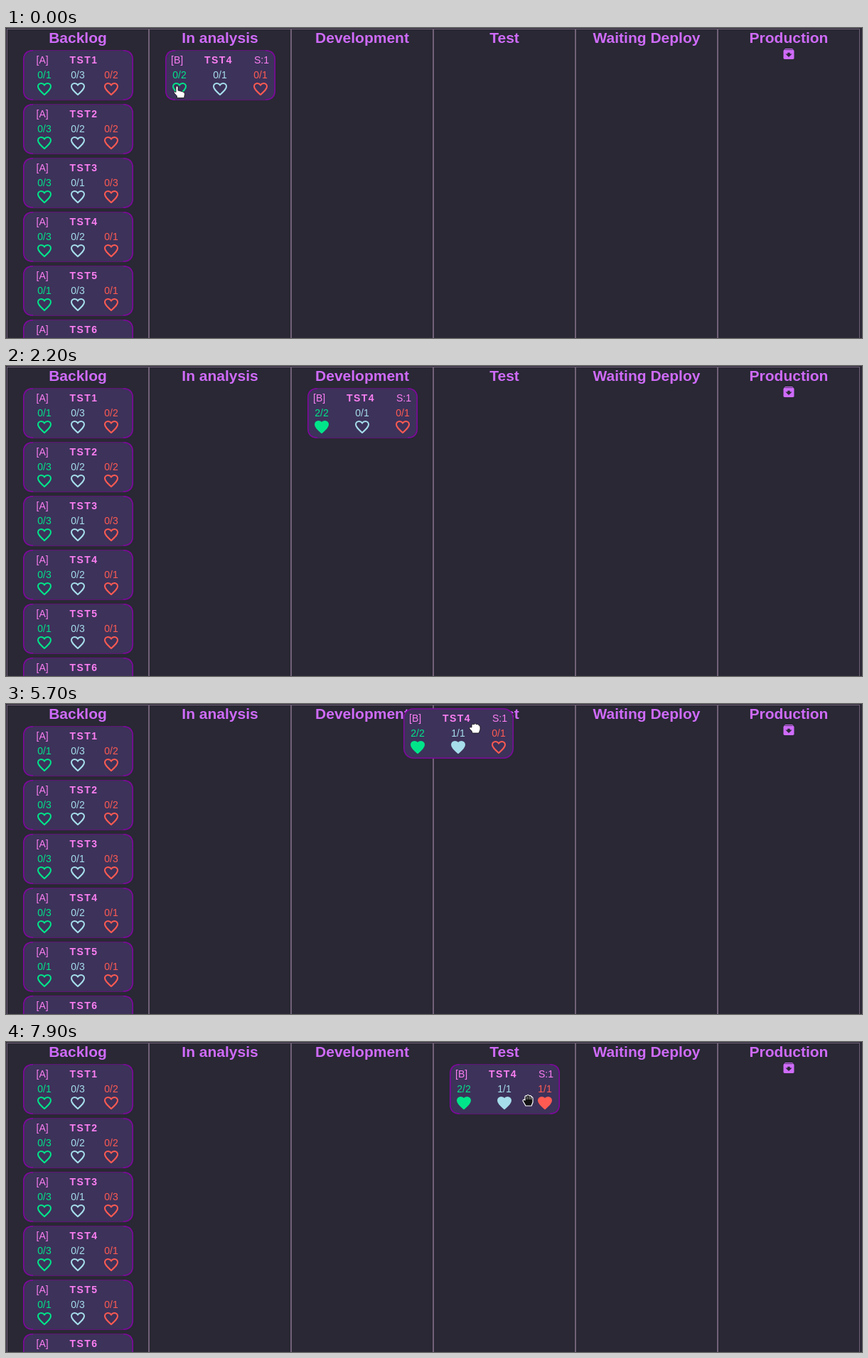
An HTML page that plays this animation: 1204x437 px, repeating every 8000 ms.

```html
<!DOCTYPE html>
<html lang="en">
<head>
<meta charset="utf-8">
<title>Board</title>
<style>
  html, body { margin: 0; width: 100%; height: 100%; overflow: hidden; background: #292834; }
  svg { display: block; width: 1204px; height: 437px; }
  text { font: 14px "Liberation Sans", Arial, sans-serif; }
  .head { font-size: 21px; font-weight: bold; fill: #cf6bfa; text-anchor: middle; }
  .title { font-weight: bold; letter-spacing: 1.4px; }
  .pink { fill: #fb7ff2; }
  .mid { text-anchor: middle; }
</style>
</head>
<body>
<svg viewBox="0 0 1204 437">
  <defs>
    <path id="heart" stroke-width="2" d="M12 20C6.5 15 3 11.9 3 8.5C3 6 5 4 7.5 4C9.4 4 11.1 5 12 6.4C12.9 5 14.6 4 16.5 4C19 4 21 6 21 8.5C21 11.9 17.5 15 12 20Z"/>
    <g id="arrow" fill="#111" stroke="#fff" stroke-width="1.2" stroke-linejoin="round">
      <path d="M-4-8V6L-1 3L1.5 8.5L4 7.3L1.6 2H6Z"/>
    </g>
    <g id="point" fill="#fff" stroke="#111" stroke-width=".8">
      <path d="M-5-7Q-3-9.500-2-7V-2L5 0Q7.500 1 7.500 3L6.500 8.500H-3.500V6L-8 1Q-7.500-1.500-5 .500Z"/>
    </g>
    <g id="fist" fill="#fff" stroke="#111" stroke-width=".8">
      <path d="M-4-4Q-3-7-1-5Q1-8 3-5Q5-7 6-4Q8-4 8-1V2L6 7H-3L-4 4L-7 1Q-8-2-4-1Z"/>
    </g>
    <g id="grab" fill="#111" stroke="#fff" stroke-width="1.2" stroke-linejoin="round">
      <path d="M-4-5Q-3-7-1.500-6Q0-9 2-6Q4-7.500 5-4.500Q7-5 7-2V3L5 8H-3L-7 1Q-6.500-2-4 0Z"/>
      <path d="M-1-5V-1M2-5V-1M4.500-4V-1" stroke-width=".7"/>
    </g>
  </defs>
  <g id="board"></g>
  <g id="moving"></g>
</svg>
<script>
const LOOP = 8000, STEP = 100;
const HEART_COLORS = ['#00e58a', '#a6deeb', '#ff5b52'];
const COLUMNS = ['Backlog', 'In analysis', 'Development', 'Test', 'Waiting Deploy', 'Production'];
const BACKLOG_TOTALS = ['132', '322', '313', '321', '131', '222'];

// [time, x, y]
const cardPath = [
  [0, 224, 31], [1100, 224, 31], [1600, 364, 22], [2000, 555, 14], [2200, 424, 31],
  [5100, 424, 31], [5700, 559, 6], [5900, 650, 3], [6000, 692, 9], [6100, 702, 10], [6200, 624, 31]
];
// [time, x, y, shape]; no shape means the pointer is off stage
const cursorPath = [
  [0, 244, 90, 'point'], [800, 244, 90, 'point'], [1000, 274, 97, 'grab'],
  [1100, 292, 61, 'fist'], [1600, 432, 53, 'fist'], [2000, 623, 45, 'fist'], [2100, 628, 25, 'arrow'], [2200, 628, 0],
  [3300, 528, 6, 'arrow'], [3500, 523, 42, 'grab'], [3700, 508, 92, 'point'], [4000, 505, 99.5, 'point'],
  [4100, 505, 102, 'point'], [4200, 505, 102, 'point'], [4300, 470, 106, 'arrow'], [4600, 206, 90, 'arrow'],
  [4900, 558, 33, 'grab'], [5000, 524, 59, 'grab'],
  [5100, 524, 59, 'fist'], [5700, 659, 34, 'fist'], [5900, 750, 31, 'fist'], [6000, 792, 37, 'fist'],
  [6100, 802, 38, 'fist'], [6200, 802, 20, 'arrow'], [6300, 802, 0],
  [7100, 793, 5, 'arrow'], [7300, 783, 50, 'grab'], [7500, 760, 96, 'point'], [7700, 758, 96, 'point'],
  [7900, 734, 82, 'grab']
];

function sample(path, time) {
  const index = path.findLastIndex(key => key[0] <= time);
  const [t0, x0, y0, shape] = path[index];
  const [t1, x1, y1] = path[index + 1] || [t0 + 1, x0, y0];
  const k = Math.min(1, (time - t0) / (t1 - t0));
  return { x: x0 + (x1 - x0) * k, y: y0 + (y1 - y0) * k, shape };
}

const text = (x, y, cls, content, fill = '') =>
  `<text x="${x}" y="${y}" class="${cls}" ${fill && `fill="${fill}"`}>${content}</text>`;

const rect = (x, y, w, h, attrs) =>
  `<rect x="${x}" y="${y}" width="${w}" height="${h}" ${attrs}/>`;

function card({ x, y, kind, title, done, totals, size, lifted }) {
  const gap = size ? 57 : 47;
  const hearts = HEART_COLORS.map((color, i) => {
    const cx = 77 + (i - 1) * gap;
    const full = done[i] == totals[i];
    return text(cx, 40, 'mid', `${done[i]}/${totals[i]}`, color) +
      `<use href="#heart" x="${cx - 12}" y="43" stroke="${color}" fill="${full ? color : 'none'}"/>`;
  }).join('');
  return `<g transform="translate(${x} ${y})">` +
    rect(0, 0, 155, 71, 'rx="14" fill="#7d0a9c"' + (lifted ? '' : ' opacity=".65"')) +
    rect(1.5, lifted ? 1.5 : 1, 152, lifted ? 68 : 69, 'rx="13" fill="#3d325a"') +
    (lifted ? '' : '<path d="M14 .75Q.75 .75 .75 14V57Q.75 70 14 70M141 .75Q154.250 .75 154.250 14V57Q154.250 70 141 70" fill="none" stroke="#7d0a9c" stroke-width="1.500"/>') +
    text(size ? 8 : 18.5, 19, 'pink', `[${kind}]`) +
    text(size ? 55 : 65.5, 19, 'pink title', title) +
    (size ? text(125, 19, 'pink', size) : '') + hearts + '</g>';
}

function drawBoard() {
  const columns = COLUMNS.map((name, i) =>
    rect(1.5 + i * 200, 1.5, 199, 460, 'fill="none" stroke="#716177"') +
    text(101 + i * 200, 21, 'head', name)).join('');
  const backlog = BACKLOG_TOTALS.map((totals, i) =>
    card({ x: 24, y: 31 + i * 76, kind: 'A', title: `TST${i + 1}`, done: '000', totals })).join('');
  const archive = `<g transform="translate(1091 26.500) scale(.833)">
    <path fill="#cf6bfa" d="M6 3H18L21 6.500V19Q21 21 19 21H5Q3 21 3 19V6.500Z"/>
    <path fill="#292834" d="M5.500 4.200H18.500V5.200H5.500ZM10 10H14V12H17.500L12 17.500L6.500 12H10Z"/></g>`;
  document.getElementById('board').innerHTML = columns + backlog + archive;
}

function drawMoving(time) {
  const during = (from, to) => time >= from && time < to;
  const { x, y } = sample(cardPath, time);
  const cursor = sample(cursorPath, time);
  const done = [(time >= 500) + (time >= 800), +(time >= 4200), +(time >= 7700)];
  const slotX = during(1500, 2200) ? 428 : during(5800, 6200) ? 628 : 0;
  document.getElementById('moving').innerHTML =
    (slotX ? rect(slotX, 26, 146, 67, 'fill="#3d325a"') : '') +
    card({ x, y, kind: 'B', title: 'TST4', done, totals: '211', size: 'S:1', lifted: y !== 31 }) +
    (cursor.shape ? `<use href="#${cursor.shape}" x="${cursor.x}" y="${cursor.y}"/>` : '');
}

let shown = -1;
function tick() {
  const time = Math.floor(performance.now() % LOOP / STEP) * STEP;
  if (time !== shown) drawMoving(shown = time);
  requestAnimationFrame(tick);
}

drawBoard();
tick();
</script>
</body>
</html>
```
